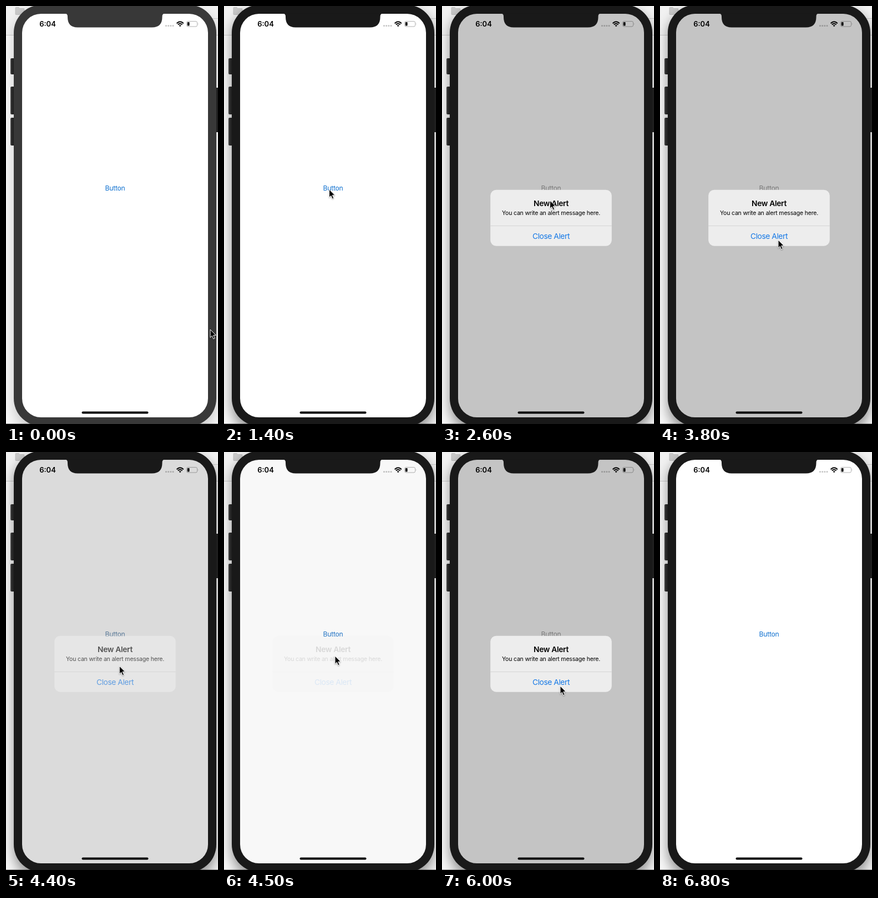
An HTML page that plays this animation: 382 px wide and 752 px high, repeating every 7.2 s.

```html
<!DOCTYPE html>
<html lang="en">
<head>
<meta charset="utf-8">
<title>Alert demo</title>
<style>
  html, body { margin: 0; width: 100%; height: 100%; overflow: hidden; background: #f6f6f6; }
  svg { display: block; }
  text { font-family: Inter, Roboto, sans-serif; text-anchor: middle; }
  .semi { font-weight: 600; }
</style>
</head>
<body>
<svg width="382" height="752" viewBox="0 0 382 752">
  <defs>
    <clipPath id="glass"><rect x="29" y="14" width="335" height="726" rx="34"/></clipPath>
    <linearGradient id="key">
      <stop offset="0" stop-color="#4a4a4a"/><stop offset=".35" stop-color="#262626"/><stop offset="1" stop-color="#1c1c1c"/>
    </linearGradient>
    <filter id="soft" x="-30%" y="-20%" width="160%" height="140%"><feGaussianBlur stdDeviation="11"/></filter>
  </defs>

  <!-- desktop window behind the phone -->
  <rect width="382" height="752" fill="#f8f8f8"/>
  <rect width="382" height="52" fill="#f1f1f1"/>
  <path d="M0 52.5H382M340 22.5H382" stroke="#cbcbcb"/>
  <path d="M17 3.5q0-1 1-1h5l2 2h7q1 0 1 1v9q0 1-1 1H18q-1 0-1-1z" fill="#cacaca" stroke="#b5b5b5" stroke-width=".7"/>
  <path d="M0 751.5H382" stroke="#999"/>
  <rect id="shade" x="14" y="8" width="365" height="760" rx="50" filter="url(#soft)"/>

  <!-- phone -->
  <g fill="url(#key)">
    <rect x="8" y="94" width="9" height="29" rx="2"/>
    <rect x="8" y="145" width="9" height="50" rx="2"/>
    <rect x="8" y="201" width="9" height="50" rx="2"/>
  </g>
  <rect x="377" y="147" width="9" height="80" rx="2" fill="#1f1f1f"/>
  <rect class="body" x="14" y="-2" width="365" height="758" rx="50"/>

  <g clip-path="url(#glass)">
    <rect x="29" y="14" width="335" height="726" fill="#fff"/>
    <g fill="#c6c6c6">
      <rect x="287" y="34.2" width="2.9" height="2.9" rx=".8"/>
      <rect x="291.2" y="34.2" width="2.9" height="2.9" rx=".8"/>
      <rect x="295.4" y="34.2" width="2.9" height="2.9" rx=".8"/>
      <rect x="299.6" y="34.2" width="2.9" height="2.9" rx=".8"/>
    </g>
    <rect x="325.4" y="27.6" width="19.2" height="9.4" rx="2.6" fill="none" stroke="#a8a8a8" stroke-width=".9"/>
    <path d="M345.8 30.8q1.6 1.5 0 3z" fill="#a8a8a8"/>
    <text id="button" x="196.5" y="332" font-size="12.15" letter-spacing="-.02em">Button</text>
    <rect id="dim" x="29" y="14" width="335" height="726"/>
    <text class="semi" x="75" y="37" font-size="13">6:04</text>
    <rect x="326.8" y="29" width="3.8" height="6.6" rx="1"/>
    <g fill="none" stroke="#000" stroke-width="2">
      <path d="M307.6 31.2Q313.7 25.4 319.8 31.2M309.8 33.6Q313.7 30 317.6 33.6"/>
    </g>
    <path d="M311.6 35.1Q313.7 33.5 315.8 35.1L313.7 37.3z"/>
    <rect x="136.5" y="729.5" width="120" height="4" rx="2"/>

    <g id="alert">
      <rect x="87.2" y="330.7" width="218.6" height="101" rx="10.5" fill="#ededed"/>
      <path d="M87.2 395.5H305.8" stroke="#d2d2d2" stroke-width=".9"/>
      <text class="semi" x="196.5" y="360" font-size="13.77" letter-spacing="-.022em">New Alert</text>
      <text x="196.5" y="376.3" font-size="10.53" letter-spacing="-.018em">You can write an alert message here.</text>
      <text x="196.5" y="419" font-size="13.77" letter-spacing="-.03em" fill="#1478e6">Close Alert</text>
    </g>
  </g>
  <path class="body" d="M106 13.5q5 0 5 5.500v1q0 18.500 18 18.500h134q18.500 0 18.500-18.500v-1q0-5.500 5-5.500z"/>

  <path id="cursor" d="M0 0V14.400L3.300 11.300 5.700 16.900 8.200 15.800 5.800 10.300H10.300z"
    stroke="#fff" stroke-width="1" style="filter:drop-shadow(0 1px 1px rgba(0,0,0,.35))"/>
</svg>

<script>
const LOOP = 7200, STEP = 100;
const $ = id => document.getElementById(id);
const bodies = document.querySelectorAll('.body');
const clamp = v => Math.max(0, Math.min(1, v));
const mix = (a, b, k) => a + (b - a) * k;

// Pointer stops: time, x, y
const stops = [
  [0, 368, 582], [300, 276, 456], [400, 276, 456], [1000, 191, 333],
  [1300, 191, 333], [1400, 189.500, 330], [2400, 189.500, 330], [2900, 202, 380],
  [3200, 213, 421], [4200, 213, 421], [4500, 200, 367], [5000, 206, 351],
  [5400, 206, 351], [5900, 213, 421], [LOOP, 213, 421]
];
const ACTIVE = 500, GONE = 6400;

// Each round: press the button, present the alert, dismiss it
const rounds = [
  { press: 2000, show: 2152, hide: 4342 },
  { press: 5100, show: 5269, hide: 6050 }
];

// Critically damped spring, 0 to 1
function spring(ms) {
  const x = Math.max(0, ms) * .02285;
  return 1 - (1 + x) * Math.exp(-x);
}

function pointer(t) {
  const i = stops.findIndex(s => s[0] > t);
  const [t0, x0, y0] = stops[i - 1], [t1, x1, y1] = stops[i];
  const k = (t - t0) / (t1 - t0);
  return [mix(x0, x1, k), mix(y0, y1, k)];
}

function draw(t) {
  const active = t >= ACTIVE;
  bodies.forEach(b => b.setAttribute('fill', active ? '#191919' : '#383838'));
  $('shade').setAttribute('opacity', active ? .42 : .18);

  const [x, y] = pointer(t);
  $('cursor').setAttribute('transform', `translate(${x} ${y})`);
  $('cursor').setAttribute('visibility', t < GONE ? 'visible' : 'hidden');

  let shown = 0, scale = 1, ink = 1;
  for (const r of rounds) {
    if (t < r.press || t > r.hide + 900) continue;
    const enter = spring(t - r.show);
    shown = enter * (1 - spring(t - r.hide));
    scale = 1 + .2 * (1 - enter);
    ink = mix(.2, 1, clamp((t - r.show) / 250));
  }
  $('dim').setAttribute('opacity', .23 * shown);
  $('alert').setAttribute('opacity', shown);
  $('alert').setAttribute('transform',
    `translate(196.5 381.2) scale(${scale}) translate(-196.5 -381.2)`);

  const tint = [18, 114, 208].map(c => Math.round(mix(c, 156, shown)));
  $('button').setAttribute('fill', `rgb(${tint})`);
  $('button').setAttribute('opacity', ink);
}

const start = performance.now();
function tick() {
  const t = (performance.now() - start) % LOOP;
  draw(Math.floor(t / STEP) * STEP);
  requestAnimationFrame(tick);
}
draw(0);
requestAnimationFrame(tick);
</script>
</body>
</html>
```
